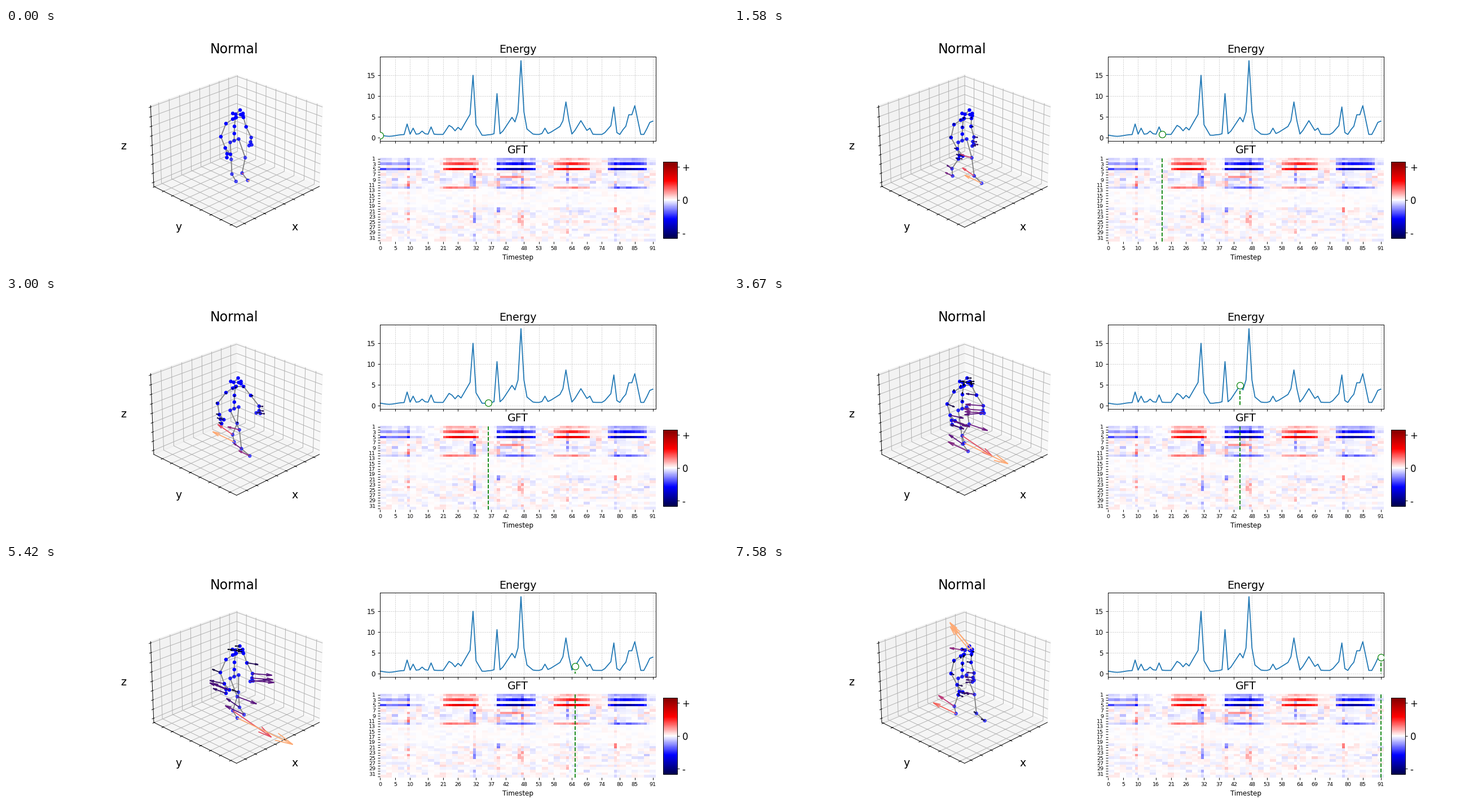
Write a matplotlib script that moves like this. It is 1280 by 427 pixels and loops after 7.66 s.

```python
import numpy as np
import matplotlib.pyplot as plt
from matplotlib.animation import FuncAnimation
from matplotlib.collections import LineCollection

N, LOOP_MS = 92, 7660
W, H, DPI = 1280, 427, 1280 / 15
T = np.arange(N)

CHAINS = [
    "pelvis navel chest neck head crown",
    "head earR", "head nose eye earL", "neck clavR shoulderR", "neck clavL shoulderL",
    "shoulderR elbowR wristR handR tipR", "wristR thumbR",
    "shoulderL elbowL wristL handL tipL", "wristL thumbL",
    "pelvis hipR kneeR ankleR footR", "pelvis hipL kneeL ankleL footL",
]
BONES = [pair for c in CHAINS for pair in zip(c.split(), c.split()[1:])]

# The walk eases in from rest, then one cycle takes about 37 steps.
# Phase 0 is the middle of the right foot's swing.
PHASE = np.where(T < 9, -2.95 + .45 * (T / 9) ** 2,
                 np.interp(T, [9, 28, 91], [-2.5, 0, 10.7]))


def path(x, y, dx=0, dy=0, drive=0):
    """A point at (x, y) that moves by (dx, dy) times the drive signal."""
    return np.array([x + dx * drive + 0 * T, y + dy * drive + 0 * T])


def build_joints():
    """Joint paths in stage pixels."""
    pos = {}
    for side, phase, ox, oy in [("R", PHASE, 0, 0), ("L", PHASE - np.pi, 12, -6)]:
        # The foot swings forward quickly and drifts back slowly.
        step = np.sin(phase + .5 * np.sin(phase))
        shift = np.array([[ox], [oy]])
        pos["knee" + side] = path(405, 235, 8, 3, step) + path(0, 0, 5, 1, np.cos(phase)) + shift
        pos["ankle" + side] = path(402, 261, 16, 11, step) + shift
        pos["foot" + side] = path(410, 274, 23, 11, step) + shift

    right, left = -np.sin(PHASE), np.sin(PHASE)
    pos["elbowR"] = path(380, 193, 5, 2, right)
    pos["wristR"] = path(387, 213, 9, 2, right)
    pos["handR"] = path(390, 223, 10, 4, right)
    pos["tipR"] = path(390, 230, 8, 3, right)
    pos["thumbR"] = pos["handR"] + [[6], [1]]
    pos["elbowL"] = path(427, 176, 7, 1, left)
    pos["wristL"] = path(437, 195, 12, 1, left)
    pos["handL"] = path(436, 203, 13, 1, left)
    pos["tipL"] = path(433, 209, 11, -1, left)
    pos["thumbL"] = pos["handL"] + [[2], [5]]

    pos["pelvis"] = path(404.5, 200.5)
    pos["chest"] = path(405, 176, 0, -1, np.cos(2 * PHASE))
    pos["navel"] = (pos["chest"] + pos["pelvis"]) / 2
    pos["crown"] = path(414.5, 146, 3, 0, right)
    for base, name, dx, dy in [
        ("chest", "neck", 1.5, -15), ("chest", "clavR", -3, -13), ("chest", "clavL", 3, -16),
        ("chest", "shoulderR", -15, -5), ("chest", "shoulderL", 16, -16),
        ("crown", "head", -8, 7.5), ("crown", "earR", -13, 6), ("crown", "nose", 1, 8),
        ("crown", "eye", 5, 6), ("crown", "earL", 5, 10),
        ("pelvis", "hipR", -7, 3), ("pelvis", "hipL", 8, -3),
    ]:
        pos[name] = pos[base] + [[dx], [dy]]
    return pos


def build_arrows(pos, energy):
    """Arrows are scaled velocities, with jolts at energy peaks and a last jerk of the head."""
    vec = {n: 17 * np.gradient(p, axis=1) for n, p in pos.items()}
    vec["tipL"] += np.outer((3, -17), np.maximum(energy - 8, 0))
    jerk = np.clip((T - 88) / 3, 0, 1)
    for n in ("crown", "nose", "eye"):
        vec[n] += np.outer((-38, -42), jerk)
    vec["head"] += np.outer((-30, -4), jerk)
    return vec


def build_energy():
    """Tents over a low floor: peak time, height and reach."""
    peaks = [(9, 3.3, 1.2), (11, 2.3, 1.6), (14, 1.6, 2.5), (17, 2.6, 1.5), (23.3, 3.3, 3),
             (26, 2.5, 3), (30, 5.6, 4.5), (31, 15, 1.2), (39, 10.6, 1.1), (44, 4.9, 4.5),
             (47, 18.5, 1.5), (48.5, 2.4, 4), (55, 2.3, 1.8), (60, 2.7, 6), (62, 8.6, 1.9),
             (67, 4.1, 3.5), (70, 2.3, 1.6), (77, 2.9, 3.5), (78, 7.4, 1.15), (83.5, 6.9, 2.5),
             (85, 7.7, 2.2), (90.6, 4.6, 3)]
    floor = .8 - .45 * np.exp(-((T - 3) / 3) ** 2) - .25 * np.exp(-((T - 34) / 2) ** 2)
    floor[81:83] = 1.9
    tents = [h * (1 - np.abs(T - p) / reach) for p, h, reach in peaks]
    return np.max([floor, *tents], axis=0)


def build_gft():
    rng = np.random.default_rng(4)
    level = np.full(32, .028)
    level[5:12] = .04
    level[12:19] = .01
    noise = np.repeat(rng.normal(size=(32, N // 2)), 2, axis=1)
    data = level[:, None] * noise

    # Dominant rows switch between red and blue with each step.
    wave = np.cos(2 * np.pi * (T - 26.5) / 37)
    wave *= np.where(np.abs(wave) > .5, 1, .15)
    wave[:10] = -.38
    wave[10:20] *= .15
    wave *= np.where(wave < 0, .75, .58)
    wave[[9, 39, 47, 78]] -= .2
    for row, gain in [(1, .25), (2, .15), (3, .65), (5, 1), (12, .38)]:
        data[row - 1] += gain * wave

    for col in (9, 31, 39, 47, 62, 78):
        data[:, col] += level * rng.normal(0, 2.5, 32)
    # first row, last row, first column, end column, value
    for r0, r1, c0, c1, v in [
        (7, 11, 30, 32, -.18), (8, 8, 40, 48, .18), (7, 10, 62, 63, -.22),
        (20, 21, 39, 40, -.3), (22, 25, 31, 32, -.22), (22, 25, 46, 48, .14),
        (21, 21, 62, 70, -.08), (20, 21, 78, 79, .25),
    ]:
        data[r0 - 1:r1, c0:c1] += v
    return np.clip(data, -1, 1)


def arrow_lines(x, y, dx, dy, ratio=.3, spread=np.radians(12)):
    tip = np.array([x + dx, y + dy])
    lines = [[(x, y), tip]]
    for a in (spread, -spread):
        back = ratio * np.array([dx * np.cos(a) - dy * np.sin(a), dx * np.sin(a) + dy * np.cos(a)])
        lines.append([tip, tip - back])
    return lines


def dot_alpha(name):
    if name.startswith(("knee", "ankle", "foot")):
        return .62
    if name.startswith(("hip", "pelvis")) or name in ("wristL", "handL", "tipL", "thumbL"):
        return .78
    return 1


ENERGY = build_energy()
POS = build_joints()
VEC = build_arrows(POS, ENERGY)
NAMES = list(POS)

fig = plt.figure(figsize=(15, H / DPI), dpi=DPI)
grid = fig.add_gridspec(2, 2, left=.125, right=.9, bottom=.11, top=.88, wspace=.03, hspace=.2)

# Room with the walking figure
room = fig.add_subplot(grid[:, 0], projection="3d")
room.view_init(25, 45)
SPAN = 8.6
room.set(xlim=(0, SPAN), ylim=(0, SPAN), zlim=(0, SPAN))
for axis in (room.xaxis, room.yaxis, room.zaxis):
    axis.set_major_formatter(lambda v, i: "")
room.set_title("Normal", fontsize=20, pad=5)
for text, x, y in [("x", 512, 360), ("y", 306, 360), ("z", 208, 216.5)]:
    fig.text(x / W, 1 - y / H, text, fontsize=16, ha="center", va="baseline")

side = .77 * H
left = (.125 + .775 / 2.03 / 2) * W - side / 2
stage = fig.add_axes([left / W, .11, side / W, .77])
stage.set(xlim=(left, left + side), ylim=(.89 * H, .12 * H))
stage.set_axis_off()
bones = stage.add_collection(LineCollection([], colors="gray", linewidths=1.5))
dots = stage.scatter(np.zeros(len(NAMES)), np.zeros(len(NAMES)), s=20, zorder=3,
                     color=[(0, 0, 1, dot_alpha(n)) for n in NAMES])
arrows = stage.add_collection(LineCollection([], linewidths=1.5, zorder=4))

# Energy curve
ticks = np.linspace(0, N - 1, 18).astype(int)
energy = fig.add_subplot(grid[0, 1])
energy.plot(T, ENERGY)
energy.set(xlim=(0, N), ylim=(-.73, 19.43), xticks=ticks, yticks=[0, 5, 10, 15])
energy.tick_params(labelbottom=False)
energy.grid(ls="--", lw=.6, alpha=.7)
energy.set_title("Energy", fontsize=16)
drop, = energy.plot([], [], "g--", lw=1.5)
ring, = energy.plot([], [], "o", ms=10, mfc="white", mec="green", mew=1, zorder=4)

# Spectrum heat map, every second row labelled
gft = fig.add_subplot(grid[1, 1])
image = gft.imshow(build_gft(), cmap="seismic", vmin=-1, vmax=1, aspect="auto",
                   interpolation="nearest", extent=(0, N, 32, 0))
gft.set_xticks(ticks)
rows = np.arange(1, 33)
gft.set_yticks(rows - .5, [r if r % 2 else "" for r in rows])
gft.tick_params(labelsize=8)
gft.spines[:].set_visible(False)
gft.set_xlabel("Timestep")
gft.set_title("GFT", fontsize=16)
cursor = gft.axvline(0, color="green", ls="--", lw=1.5)

bar = fig.colorbar(image, cax=fig.add_axes([.91, .125, .02, .318]), ticks=[-.86, 0, .86])
bar.ax.set_yticklabels(["-", "0", "+"], fontsize=14)


def draw(t):
    # The grid slides with the walker.
    sway = np.sin(np.pi * t / 75)
    for axis, shift in [(room.xaxis, .75 + .22 * sway), (room.yaxis, .5 + .12 * sway),
                        (room.zaxis, .15)]:
        marks = SPAN - shift - np.arange(9)
        axis.set_ticks(marks[marks >= 0][::-1])

    at = {n: POS[n][:, t] for n in NAMES}
    bones.set_segments([[at[a], at[b]] for a, b in BONES])
    dots.set_offsets([at[n] for n in NAMES])

    sizes = {n: np.hypot(*VEC[n][:, t]) for n in NAMES}
    top = max(sizes.values())
    lines, colors = [], []
    for n in NAMES:
        if sizes[n] > 2:
            lines += arrow_lines(*at[n], *VEC[n][:, t])
            colors += [plt.cm.magma(.82 * sizes[n] / top)] * 3
    arrows.set_segments(lines)
    arrows.set_color(colors)

    drop.set_data([t, t], [ENERGY[t], 0])
    ring.set_data([t], [ENERGY[t]])
    cursor.set_xdata([t, t])
    cursor.set_visible(t > 0)
    return bones, dots, arrows, drop, ring, cursor


anim = FuncAnimation(fig, draw, frames=N, interval=LOOP_MS / N, repeat=True,
                     repeat_delay=0, init_func=lambda: draw(0), blit=False)
plt.show()
```
